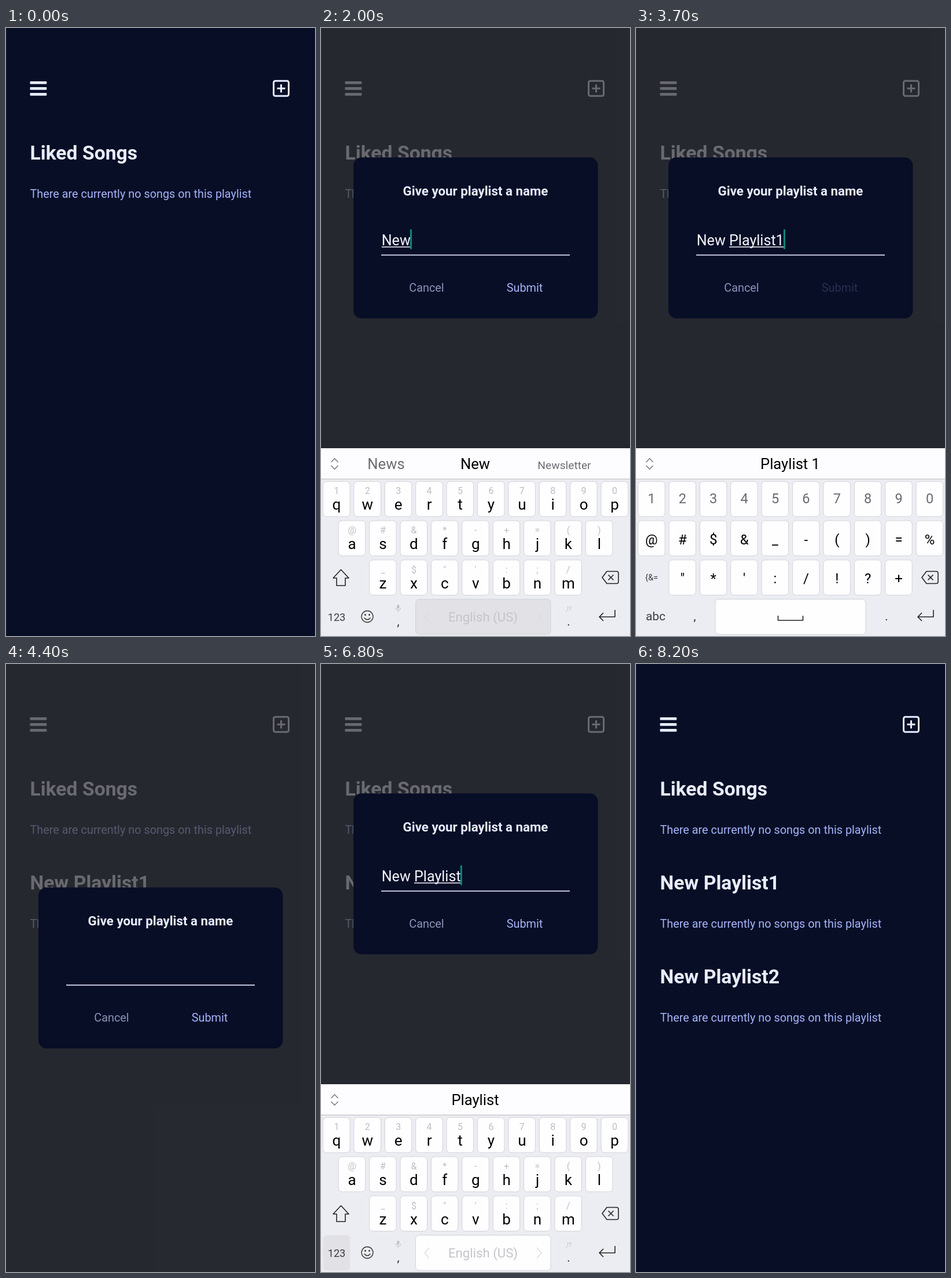
Write an HTML page that moves like this. It is 534 px wide and 1049 px high and loops after 8.3 s.

```html
<!DOCTYPE html>
<html lang="en">
<head>
<meta charset="utf-8">
<title>Create playlists</title>
<style>
html, body { margin: 0; width: 100%; height: 100%; overflow: hidden; background: #080e26; }
svg { display: block; width: 100%; height: 100%; font-family: Roboto, sans-serif; }
text { white-space: pre; }
</style>
</head>
<body>
<svg id="stage" viewBox="0 0 534 1049"></svg>
<script>
const LOOP = 8300;
const NAVY = '#080e26', PALE = '#e8edff', BLUE = '#a5b4fa', KEY = '#fefdff', DOWN = '#e1e1e6';
const INPUT_X = 104.7, INPUT_SIZE = 25.1;

const stage = document.getElementById('stage');
const clamp = v => Math.max(0, Math.min(1, v));
const easeOut = v => 1 - (1 - clamp(v)) ** 3;
const show = (node, on) => node.setAttribute('display', on ? 'inline' : 'none');

function el(parent, tag, attrs = {}, content) {
  const node = document.createElementNS('http://www.w3.org/2000/svg', tag);
  for (const name in attrs) node.setAttribute(name, attrs[name]);
  if (content !== undefined) node.textContent = content;
  parent.appendChild(node);
  return node;
}
const group = parent => el(parent, 'g');
const rect = (parent, x, y, width, height, fill, rx = 0, more = {}) =>
  el(parent, 'rect', { x, y, width, height, fill, rx, ...more });
const label = (parent, x, y, size, fill, str, more = {}) =>
  el(parent, 'text', { x, y, 'font-size': size, fill, ...more }, str);
const centred = (parent, x, y, size, fill, str, more = {}) =>
  label(parent, x, y, size, fill, str, { 'text-anchor': 'middle', ...more });
const line = (parent, d, stroke, width = 1.5, fill = 'none') =>
  el(parent, 'path', { d, stroke, fill, 'stroke-width': width, 'stroke-linejoin': 'round' });

const pen = document.createElement('canvas').getContext('2d');
function measure(str, size) {
  pen.font = size + 'px Roboto, sans-serif';
  return pen.measureText(str).width;
}

// Playlist page
const page = group(stage);
rect(page, 0, 0, 534, 1049, NAVY);
rect(page, 0, 0, 1, 1049, '#182037');
for (const y of [92, 102, 112]) rect(page, 41.5, y, 28.8, 4.8, PALE, 1);
const plus = group(page);
rect(plus, 462.5, 91.2, 26, 26, 'none', 3, { stroke: PALE, 'stroke-width': 3 });
line(plus, 'M468.5 104.2h14M475.5 97.2v14', PALE, 3);

const lists = ['Liked Songs', 'New Playlist1', 'New Playlist2'].map((name, i) => {
  const g = group(page), y = 162.2 * i;
  label(g, 41.5, 227 + y, 33.7, PALE, name, { 'font-weight': 700 });
  label(g, 41.5, 292.5 + y, 19.85, BLUE, 'There are currently no songs on this playlist');
  return g;
});

// Dialog
const modal = group(stage);
rect(modal, 0, 0, 534, 1049, 'rgb(52,52,52)', 0, { 'fill-opacity': 0.7 });
const card = group(modal);
rect(card, 56, 223.3, 422.5, 277.7, NAVY, 14);
centred(card, 267, 289, 22.3, PALE, 'Give your playlist a name', { 'font-weight': 700 });
rect(card, 104, 390.8, 326, 1.8, '#d3daf2');
const entry = label(card, INPUT_X, 374.7, INPUT_SIZE, '#f3f5ff', '');
const underline = rect(card, 0, 377, 0, 1.5, '#f3f5ff');
const caret = rect(card, 0, 347.5, 3, 34, '#0b877c');
centred(card, 182.5, 455, 19.85, '#8a94ba', 'Cancel');
const submit = centred(card, 352, 455, 19.85, BLUE, 'Submit');

// Keyboard
const board = group(stage);
rect(board, 0, 725, 534, 324, '#ecedf2');
rect(board, 0, 725, 534, 53, '#fdfcff');
rect(board, 0, 777.5, 534, 1.5, '#cbcbd0');
line(board, 'M17.5 749l6-6.3 6 6.3M17.5 755l6 6.3 6-6.3', '#77777c', 1.4);
const slots = [112.5, 266.5, 420.5].map((x, i) =>
  centred(board, x, 760.5, 25.6, i === 1 ? '#000' : '#6d6d72', ''));

const ROW_Y = [782.3, 850, 917.8, 985.5];
const keycap = (g, x, row, width = 46.5) =>
  rect(g, x, ROW_Y[row], width, 60.7, KEY, 6, { stroke: '#d3d3d9' });
const flat = (g, x, row, width = 46.5) =>
  rect(g, x, ROW_Y[row], width, 60.7, 'none', 6);

function backspace(g, x) {
  line(g, `M${x - 14} 948l8-10.5h17q3 0 3 3v15q0 3-3 3h-17z`, '#222', 1.6);
  line(g, `M${x - 3.5} 943.5l9 9m0-9l-9 9`, '#222', 1.6);
}
function enter(g, x) {
  line(g, `M${x + 14} 1004v12h-27m7-7l-7 7 7 7`, '#222', 1.6);
}

function letterLayer(upper) {
  const g = group(board), caps = {};
  const rows = [['qwertyuiop', '1234567890', 3.5], ['asdfghjkl', '@#&*-+=()', 30.2], ['zxcvbnm', '_$"\':;/', 83.6]];
  rows.forEach(([chars, hints, left], r) => [...chars].forEach((c, i) => {
    const x = left + 53.4 * i, ch = upper ? c.toUpperCase() : c;
    caps[ch] = keycap(g, x, r);
    centred(g, x + 23.4, ROW_Y[r] + 22, 16, '#bebec3', hints[i]);
    centred(g, x + 23.4, ROW_Y[r] + 48.7, 26, '#000', ch);
  }));
  caps.shift = flat(g, 3.5, 2, 62);
  line(g, 'M34.5 934.5l13.5 14.5h-6v13h-15v-13h-6z', '#222', 1.6, upper ? '#222' : 'none');
  backspace(g, 500);
  caps['123'] = flat(g, 3.5, 3);
  centred(g, 27, 1022.5, 18.2, '#3c3c40', '123');
  el(g, 'circle', { cx: 80, cy: 1015.5, r: 10, fill: 'none', stroke: '#333', 'stroke-width': 1.4 });
  for (const x of [76.5, 83.5]) el(g, 'circle', { cx: x, cy: 1012.5, r: 1.4, fill: '#333' });
  line(g, 'M74.5 1017.5q5.5 6.5 11 0', '#333', 1.4);
  rect(g, 131.3, 995, 4, 7, '#bebec3', 2);
  line(g, 'M129 1000q0 4.5 4.3 4.5t4.3-4.5M133.3 1004.5v3', '#bebec3', 1);
  centred(g, 133.5, 1031, 20, '#222', ',');
  caps[' '] = keycap(g, 163.5, 3, 233.5);
  line(g, 'M187 1007l-8 9 8 9M373 1007l8 9-8 9', '#dcdce0', 1.4);
  centred(g, 280, 1023.7, 22.2, '#c5c5ca', 'English (US)');
  centred(g, 428, 1006, 11, '#bebec3', ',!?');
  centred(g, 428, 1031, 20, '#222', '.');
  enter(g, 494);
  return { g, caps };
}

function symbolLayer() {
  const g = group(board), caps = {};
  [['1234567890', 3.5], ['@#$&_-()=%', 3.5], ['"*\':/!?+', 56.9]].forEach(([chars, left], r) =>
    [...chars].forEach((c, i) => {
      const x = left + 53.4 * i;
      caps[c] = keycap(g, x, r);
      centred(g, x + 23.4, ROW_Y[r] + (r ? 40.5 : 38), r ? 24 : 23.5, r ? '#000' : '#6a6a6f', c);
    }));
  centred(g, 27, 952.5, 14.5, '#3c3c40', '{&=');
  backspace(g, 508);
  centred(g, 34, 1022, 20.8, '#3c3c40', 'abc');
  centred(g, 101.5, 1022, 20, '#222', ',');
  keycap(g, 137, 3, 260);
  line(g, 'M245.5 1014v8h43v-8', '#222', 1.6);
  centred(g, 433, 1022, 20, '#222', '.');
  enter(g, 500);
  return { g, caps };
}
const layers = { lower: letterLayer(false), upper: letterLayer(true), symbols: symbolLayer() };

// Each key takes effect at its time; it is held down just before that.
const HOLD = 110;
const NAMES = ['N', 'e', 'w', ' ', 'shift', ...'Playlist', '123'];
const keys = (times, digit) => [...NAMES, digit].map((key, i) => ({ key, at: times[i] }));
const sessions = [
  { press: 460, open: 650, board: 1100, submit: 3650, close: 3850,
    keys: keys([1650, 1800, 1980, 2100, 2230, 2350, 2450, 2550, 2650, 2750, 2850, 2930, 3020, 3200, 3600], '1') },
  { press: 4060, open: 4150, board: 4650, submit: 7430, close: 7570,
    keys: keys([5120, 5270, 5420, 5560, 5850, 5960, 6060, 6160, 6260, 6360, 6460, 6560, 6670, 6880, 7280], '2') }
];

const HINTS = {
  '': ['I', 'The', 'You'],
  'N': ['No', 'Not', 'Now'],
  'Ne': ['New', 'Never', 'Next'],
  'New': ['News', 'New', 'Newsletter'],
  'New ': ['Jersey', 'York', 'Zealand'],
  'New P': ['Place', 'P', 'Park'],
  'New Pl': ['Place', 'Please', 'Play'],
  'New Pla': ['Place', 'Play', 'Plan'],
  'New Play': ['Player', 'Play', 'Playing']
};
const suggest = str => HINTS[str] || ['', str.length > 12 ? 'Playlist ' + str.slice(12) : 'Playlist', ''];

function typed(session, t) {
  let str = '', mode = 'upper', held = null;
  for (const { key, at } of session.keys) {
    if (t < at) {
      if (t >= at - HOLD) held = key;
      break;
    }
    if (key === 'shift') mode = 'upper';
    else if (key === '123') mode = 'symbols';
    else {
      str += key;
      if (mode === 'upper') mode = 'lower';
    }
  }
  return { str, mode, held };
}

function drawEntry(str, focused) {
  const end = INPUT_X + measure(str, INPUT_SIZE);
  const start = INPUT_X + measure(str.slice(0, str.lastIndexOf(' ') + 1), INPUT_SIZE);
  entry.textContent = str;
  underline.setAttribute('x', start);
  underline.setAttribute('width', Math.max(0, end - start));
  caret.setAttribute('x', end - 0.8);
  show(caret, focused);
}

function drawBoard(str, mode, held, y) {
  board.setAttribute('transform', `translate(0 ${y})`);
  show(board, y < 324);
  for (const name in layers) {
    const { g, caps } = layers[name];
    show(g, name === mode);
    for (const key in caps) {
      const idle = caps[key].hasAttribute('stroke') ? KEY : 'none';
      caps[key].setAttribute('fill', key === held ? DOWN : idle);
    }
  }
  suggest(str).forEach((word, i) => {
    slots[i].textContent = word;
    slots[i].setAttribute('font-size', measure(word, 25.6) > 105 ? 19.2 : 25.6);
  });
}

function render(t) {
  const s = sessions[t < sessions[1].press ? 0 : 1];
  const { str, mode, held } = typed(s, t);
  const fade = t < s.close ? clamp((t - s.open) / 230) : 1 - clamp((t - s.close) / 190);
  const slide = t < s.close ? easeOut((t - s.board) / 300) : 1 - easeOut((t - s.close - 30) / 330);
  // The keyboard of the first session may still be leaving when the second starts.
  const leaving = s === sessions[1] && t < s.board
    ? 1 - easeOut((t - sessions[0].close - 30) / 330) : 0;

  plus.setAttribute('opacity', t >= s.press && t < s.open ? 0.2 : 1);
  show(lists[1], t >= sessions[0].close);
  show(lists[2], t >= sessions[1].close);

  show(modal, fade > 0);
  modal.setAttribute('opacity', fade);
  card.setAttribute('transform', `translate(0 ${t < s.board + 130 ? 162.3 : 0})`);
  submit.setAttribute('opacity', t >= s.submit ? 0.2 : 1);
  drawEntry(str, t >= s.board - 50);
  drawBoard(str, leaving ? 'symbols' : mode, held, 324 * (1 - Math.max(slide, leaving)));
}

function tick() {
  render(performance.now() % LOOP);
  requestAnimationFrame(tick);
}
tick();
</script>
</body>
</html>
```
